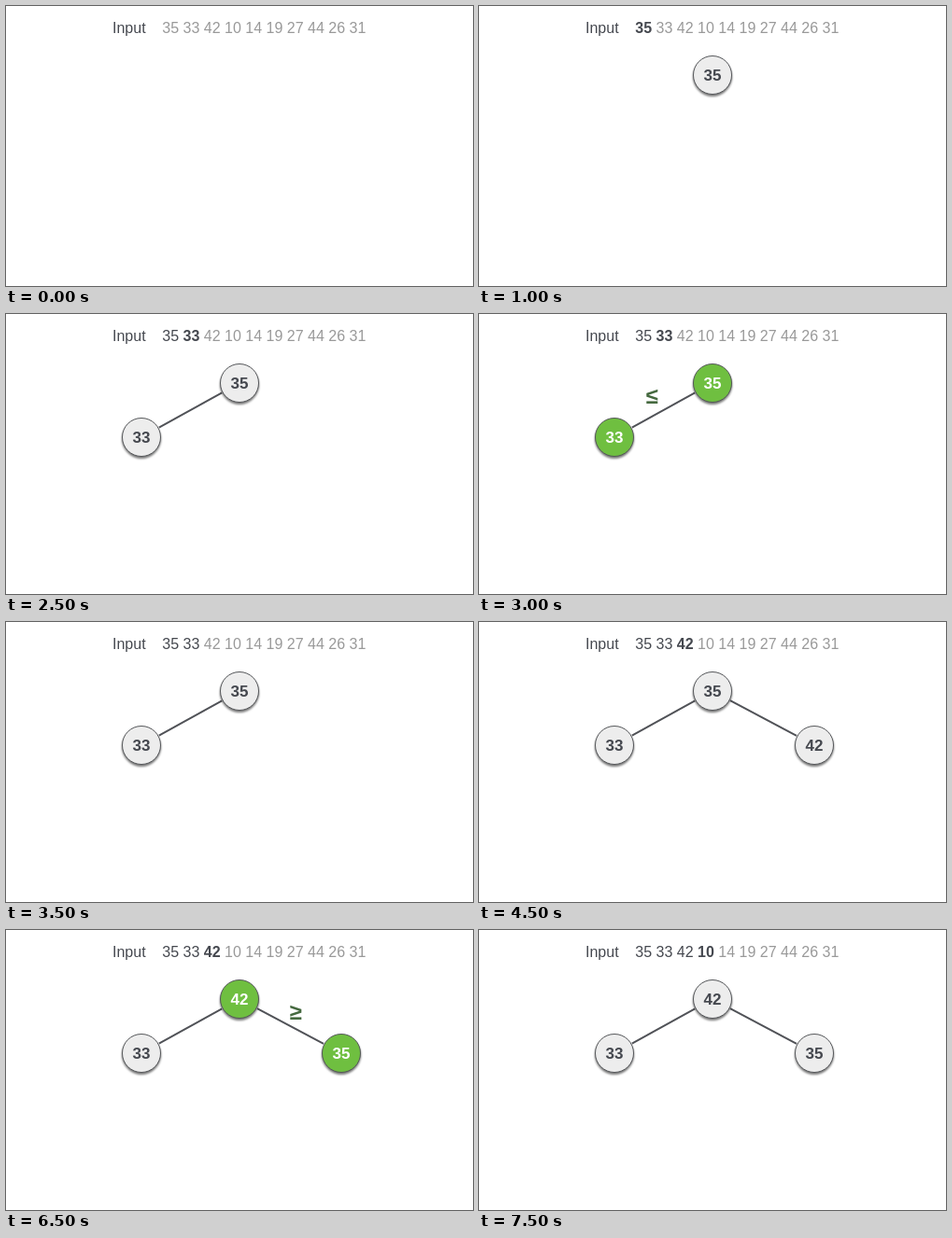
An HTML page for the animation above (8000 ms loop, 500x300 px).

```html
<!DOCTYPE html>
<html lang="en">
<head>
<meta charset="utf-8">
<title>Max heap construction</title>
<style>
  html, body { margin: 0; width: 100%; height: 100%; overflow: hidden; background: #fff; }
  svg { display: block; font: 16px "Liberation Sans", Arial, sans-serif; fill: #45484f; }
  .wait { fill: #999; }
  .bold, .node text, .sign { font-weight: bold; }
  .node text { font-size: 17px; text-anchor: middle; }
  .node circle { stroke: #55575a; filter: drop-shadow(0 2px 1.2px #0008); }
  .edge { fill: none; stroke: #505257; stroke-width: 2; }
  .sign { font-size: 24px; fill: #45693f; text-anchor: middle; }
</style>
</head>
<body>
<svg id="stage" width="500" height="300" viewBox="0 0 500 300"></svg>
<script>
const STEP = 500;
const input = [35, 33, 42, 10, 14, 19, 27, 44, 26, 31];
const places = [[250, 74], [145, 132], [359, 132]];
const grey = "#ededed", green = "#6fbf40", red = "#f15b58";

// read: numbers taken so far; bold: the last one is current;
// heap: node values; child: the node being compared with the root
const steps = [
  { read: 0, heap: [] },
  { read: 1, bold: true, heap: [35] },
  { read: 1, bold: true, heap: [35] },
  { read: 1, heap: [35] },
  { read: 2, bold: true, heap: [35] },
  { read: 2, bold: true, heap: [35, 33] },
  { read: 2, bold: true, heap: [35, 33], child: 1, color: green, sign: "≤" },
  { read: 2, heap: [35, 33] },
  { read: 3, bold: true, heap: [35, 33] },
  { read: 3, bold: true, heap: [35, 33, 42] },
  { read: 3, bold: true, heap: [35, 33, 42], child: 2, color: red },
  { read: 3, bold: true, heap: [35, 33, 42], child: 2, color: red, arrows: true },
  { read: 3, bold: true, heap: [42, 33, 35], child: 2, color: red, arrows: true },
  { read: 3, bold: true, heap: [42, 33, 35], child: 2, color: green, sign: "≥" },
  { read: 3, heap: [42, 33, 35] },
  { read: 4, bold: true, heap: [42, 33, 35] }
];

function header({ read, bold }) {
  const spans = input.map((n, i) => {
    const style = i >= read ? "wait" : bold && i === read - 1 ? "bold" : "";
    return `<tspan class="${style}">${n}</tspan>`;
  });
  return `<text x="114" y="28.5">Input</text><text x="167.3" y="28.5">${spans.join(" ")}</text>`;
}

function edge(i, arrows) {
  const [x0, y0] = places[0], [x1, y1] = places[i];
  const angle = Math.atan2(y1 - y0, x1 - x0);
  const dx = 21.5 * Math.cos(angle), dy = 21.5 * Math.sin(angle);
  const head = (x, y, turn) =>
    `<path class="edge" d="M9-5L0 0L9 5" transform="translate(${x} ${y}) rotate(${turn})"/>`;
  const deg = angle * 180 / Math.PI;
  return `<path class="edge" d="M${x0 + dx} ${y0 + dy}L${x1 - dx} ${y1 - dy}"/>` +
    (arrows ? head(x0 + dx, y0 + dy, deg) + head(x1 - dx, y1 - dy, deg + 180) : "");
}

function node(value, i, { child, color }) {
  const active = child && (i === 0 || i === child);
  const [x, y] = places[i];
  return `<g class="node"><circle cx="${x}" cy="${y}" r="20.5" fill="${active ? color : grey}"/>
    <text x="${x}" y="${y + 6}"${active ? ' fill="#fff"' : ""}>${value}</text></g>`;
}

function draw(step) {
  const { heap, child, arrows, sign } = step;
  const edges = heap.slice(1).map((_, i) => edge(i + 1, arrows && child === i + 1));
  const nodes = heap.map((value, i) => node(value, i, step));
  const mark = sign ? `<text class="sign" x="${child === 1 ? 185 : 310}" y="96">${sign}</text>` : "";
  stage.innerHTML = header(step) + edges.join("") + nodes.join("") + mark;
}

const stage = document.getElementById("stage");
let shown = -1;
function tick() {
  const index = Math.floor(performance.now() / STEP) % steps.length;
  if (index !== shown) draw(steps[shown = index]);
  requestAnimationFrame(tick);
}
tick();
</script>
</body>
</html>
```
